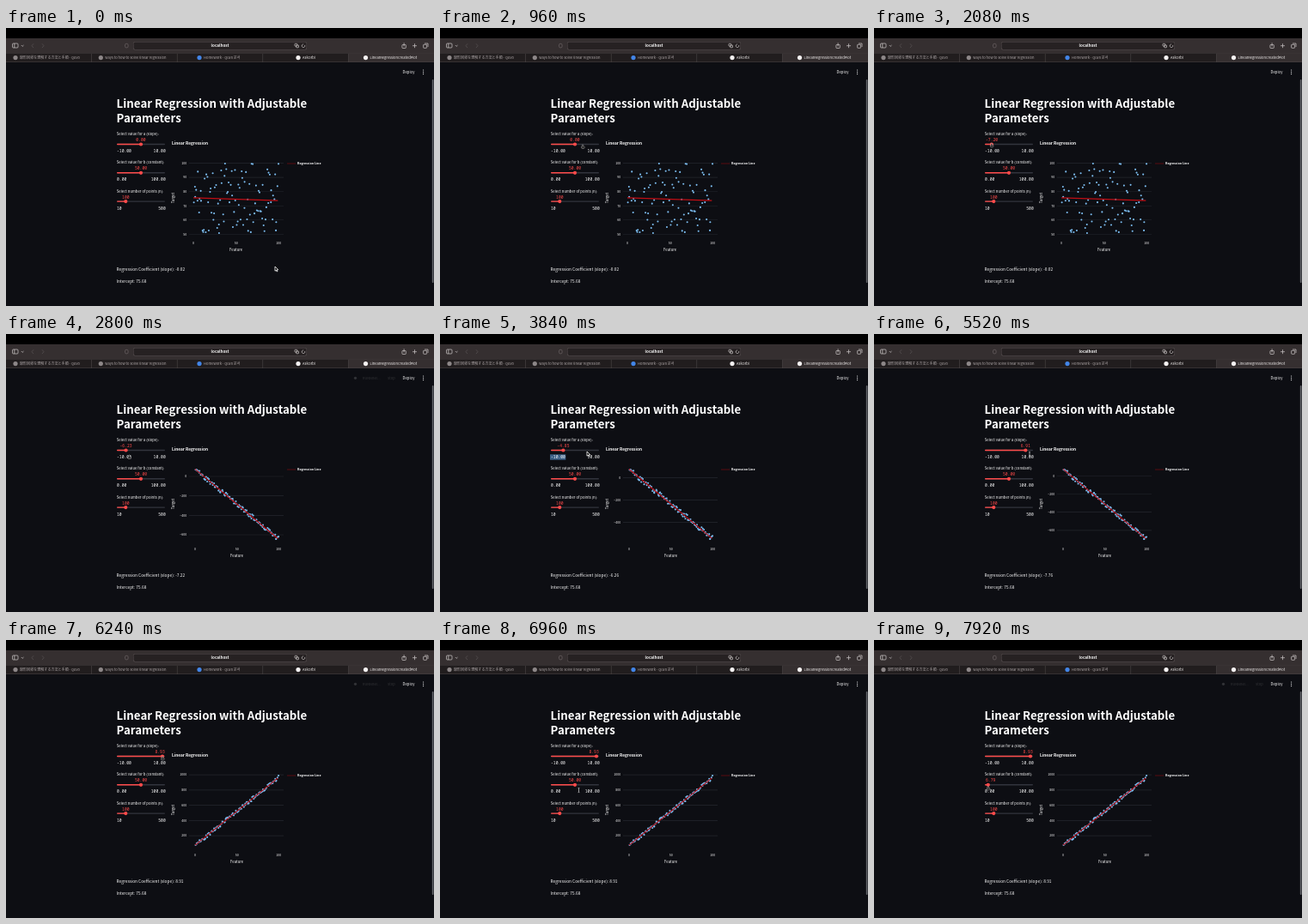
Write an HTML page with a canvas that moves like this. It is 498 px wide and 324 px high and loops after 8000 ms.

```html
<!DOCTYPE html>
<html lang="en">
<head>
<meta charset="utf-8">
<title>Linear Regression</title>
<style>
html, body { margin: 0; width: 100%; height: 100%; overflow: hidden; background: #0d0e13; }
canvas { display: block; width: 498px; height: 324px; }
</style>
</head>
<body>
<canvas id="stage" width="498" height="324"></canvas>
<script>
const ctx = document.getElementById('stage').getContext('2d');
const LOOP = 8000;
const SANS = '"Noto Sans CJK JP", "Noto Sans CJK", "Noto Sans", sans-serif';
const MONO = '"Noto Sans Mono", "DejaVu Sans Mono", monospace';
const PAGE = '#0d0e13', INK = '#fff', RED = '#ff4b4b';
const TRACK = { x: 129, w: 56, y: 135.5, gap: 33.3 };
const LAG = 80;   // the thumb trails the pointer
const BUSY = 160; // half the time the running note shows

// Pointer stops: time, x, y and the shape it takes from there on
const stops = [
  [240, 313, 278, 'arrow'], [800, 175, 148, 'hand'], [960, 166, 136.5, 'hand'],
  [1500, 157, 135, 'hand'], [2000, 136.84, 135, 'hand'], [2360, 136.84, 135, 'hand'],
  [2600, 136, 135, 'hand'], [2900, 146, 144, 'beam'], [3300, 130, 144, 'beam'],
  [3840, 171, 137, 'arrow'], [4160, 136, 136, 'hand'], [4640, 136, 136, 'hand'],
  [4760, 135.33, 136, 'hand'], [5120, 135.33, 136, 'beam'], [5520, 181, 140, 'beam'],
  [5640, 182, 136, 'hand'], [6400, 182, 136, 'beam'], [6960, 161.5, 175, 'beam'],
  [7280, 157, 169, 'hand'], [7440, 157, 169, 'hand'], [7800, 132.8, 171, 'hand']];
const slopeDrags = [[1500, 2800], [4640, 6200]];
const constDrags = [[7360, LOOP]];
const refits = [2320, 2960, 5040, 6160, 7960];

function pointerAt(t) {
  const next = stops.findIndex(s => s[0] > t);
  if (next < 0) return stops[stops.length - 1].slice(1);
  if (next === 0) return stops[0].slice(1);
  const [t0, x0, y0, kind] = stops[next - 1], [t1, x1, y1] = stops[next];
  const p = (t - t0) / (t1 - t0), e = p * p * (3 - 2 * p);
  return [x0 + (x1 - x0) * e, y0 + (y1 - y0) * e, kind];
}

// Where on its track a dragged thumb stands, from 0 to 1
function shareAt(drags, t) {
  const drag = drags.filter(d => d[0] + LAG <= t).pop();
  if (!drag) return 0.5;
  return (pointerAt(Math.min(t - LAG, drag[1]))[0] - TRACK.x) / TRACK.w;
}

const slopeAt = t => shareAt(slopeDrags, t) * 20 - 10;

function fittedAt(t) {
  const last = refits.filter(r => r <= t).pop();
  return last ? slopeAt(last - BUSY) : 0;
}

function seeded(seed) {
  return () => {
    seed = (seed + 0x6D2B79F5) | 0;
    let r = Math.imul(seed ^ (seed >>> 15), 1 | seed);
    r = (r + Math.imul(r ^ (r >>> 7), 61 | r)) ^ r;
    return ((r ^ (r >>> 14)) >>> 0) / 4294967296;
  };
}
const rnd = seeded(42);
const samples = Array.from({ length: 100 }, (_, i) => ({ x: i + rnd(), noise: 50 + rnd() * 50 }));

// Laid out at ten times the size so small glyphs keep fractional spacing
function text(str, x, y, size, { color = INK, align = 'left', weight = 500, font = SANS, turn = 0 } = {}) {
  ctx.save();
  ctx.translate(x, y);
  ctx.rotate(turn);
  ctx.scale(0.1, 0.1);
  ctx.font = `${weight} ${size * 10}px ${font}`;
  ctx.fillStyle = color;
  ctx.textAlign = align;
  ctx.fillText(str, 0, 0);
  ctx.restore();
}

function rect(x, y, w, h, color, r = 0) {
  ctx.fillStyle = color;
  ctx.beginPath();
  ctx.roundRect(x, y, w, h, r);
  ctx.fill();
}

function dot(x, y, r, color) {
  ctx.fillStyle = color;
  ctx.beginPath();
  ctx.arc(x, y, r, 0, 7);
  ctx.fill();
}

function line(pts, color, width = 0.7) {
  ctx.strokeStyle = color;
  ctx.lineWidth = width;
  ctx.beginPath();
  pts.forEach(([x, y]) => ctx.lineTo(x, y));
  ctx.stroke();
}

function box(x, y, w, h, color, r = 1) {
  ctx.strokeStyle = color;
  ctx.lineWidth = 0.7;
  ctx.beginPath();
  ctx.roundRect(x, y, w, h, r);
  ctx.stroke();
}

function toolbar() {
  const icon = '#cfcaca', faint = '#585253';
  rect(0, 0, 498, 12, '#000');
  rect(0, 12, 498, 17.5, '#352f30');
  box(7.5, 18, 6.5, 5, icon);
  line([[9.8, 18], [9.8, 23]], icon);
  line([[17.8, 20], [19.2, 21.4], [20.6, 20]], icon);
  line([[32, 18.3], [30, 20.7], [32, 23.1]], faint);
  line([[42, 18.3], [44, 20.7], [42, 23.1]], faint);
  box(138.5, 18.3, 3.6, 4.6, '#6c6566', 1.5);

  rect(148, 16, 202, 9.4, '#544d4e', 2);
  rect(148.5, 16.5, 201, 8.4, '#262122', 1.8);
  text('localhost', 249, 22.4, 4.6, { align: 'center', weight: 700 });
  box(336, 18.3, 2.8, 2.8, icon, 0.5);
  box(337.7, 20, 2.8, 2.8, icon, 0.5);
  ctx.beginPath();
  ctx.arc(346, 20.8, 1.8, -0.4, 4.8);
  ctx.stroke();

  box(460.9, 19.5, 4.4, 4, icon, 0.6);
  line([[463.1, 21.5], [463.1, 17.3]], icon);
  line([[473, 20.7], [478, 20.7]], icon);
  line([[475.5, 18.2], [475.5, 23.2]], icon);
  box(485.6, 19.3, 4, 4, icon, 0.6);
  line([[487, 18], [491, 18], [491, 22]], icon);
}

function tabs() {
  const w = 99.6, dim = '#b0a9aa', lit = '#f4f1f1';
  rect(0, 29.5, 498, 10.5, '#211d1e');
  rect(4 * w, 29.5, w, 10.5, '#352f30');
  rect(0, 29.2, 498, 0.5, '#484243');
  rect(0, 39.4, 498, 0.6, '#4c4647');
  for (let i = 1; i < 5; i++) rect(i * w - 0.3, 30, 0.6, 10, '#4c4647');
  [
    ['線形回帰を理解する方法と手順 - Quvo', 11, '#8d8788', dim],
    ['ways to how to solve linear regression', 110.3, '#8d8788', dim],
    ['Homework - Quvo 문서', 225, '#4285e8', dim],
    ['AskOrbi', 340, lit, lit],
    ['LinearRegressionCreatedPlot', 418.5, lit, lit]
  ].forEach(([name, x, mark, color]) => {
    dot(x, 34.6, 2.6, mark);
    text(name, x + 5, 36.1, 4.05, { color });
  });
}

function slider(row, label, min, max, share, value) {
  const x = TRACK.x + share * TRACK.w, y = TRACK.y + row * TRACK.gap;
  const half = value.length * 1.41;
  const mid = Math.min(Math.max(x, 130 + half), 184.7 - half);
  text(label, TRACK.x - 0.2, y - 10.4, 4.22);
  text(value, mid, y - 3.4, 4.7, { color: RED, align: 'center', font: MONO });
  rect(TRACK.x, y - 0.7, TRACK.w, 1.4, '#32343d', 0.7);
  rect(TRACK.x, y - 0.7, x - TRACK.x, 1.4, RED, 0.7);
  dot(x, y, 2.1, RED);
  text(min, TRACK.x, y + 9.6, 4.7, { font: MONO });
  text(max, 185.7, y + 9.6, 4.7, { font: MONO, align: 'right' });
}

// Fits the plot to the extent of its data and picks round ticks
function axes(slope) {
  const values = samples.map(s => slope * s.x + s.noise);
  const lo = Math.min(...values), hi = Math.max(...values), span = hi - lo;
  const decade = 10 ** Math.floor(Math.log10(span / 5));
  const gap = [1, 2, 5, 10].map(m => m * decade).find(g => g >= span / 5.2);
  const pad = span * 0.05, ticks = [];
  for (let v = Math.ceil((lo - pad) / gap) * gap; v <= hi + pad; v += gap) ticks.push(v);
  const widest = Math.max(...ticks.map(v => String(v).length));
  const x0 = 212 + 2 * widest;
  return {
    ticks,
    x: v => x0 + (317.3 - x0) * v / 100,
    y: v => 239 - (v - lo) / span * 81
  };
}

function chart(slope) {
  const { ticks, x, y } = axes(slope);
  const centre = { align: 'center' };
  text('Linear Regression', 193, 136, 4.8, { weight: 700 });
  ticks.forEach(v => {
    rect(213, y(v) - 0.3, 110, 0.6, '#24262e');
    text(String(v).replace('-', '−'), 210.3, y(v) + 1.3, 3.6, { align: 'right' });
  });
  [0, 50, 100].forEach(v => text(String(v), x(v), 251.5, 3.6, centre));
  text('Feature', x(50), 260.4, 4.3, centre);
  text('Target', 196.3, 198, 4.2, { ...centre, turn: -Math.PI / 2 });

  samples.forEach(s => dot(x(s.x), y(slope * s.x + s.noise), 1.05, '#7cbdf0'));
  const fit = v => [x(v), y(75.68 + (slope - 0.02) * v)];
  line([fit(0), fit(99)], '#c00d14', 1.1);
  line([[327, 158], [337, 158]], '#6d0c11', 0.8);
  text('Regression Line', 339, 159.4, 3.55, { weight: 700 });
}

function running() {
  const color = 'rgba(250,250,250,0.16)';
  dot(406.5, 51.3, 1.6, color);
  text('RUNNING...', 415, 52.8, 3.9, { color });
  text('Stop', 444, 52.8, 4.1, { color });
}

function pointer(x, y, kind) {
  ctx.save();
  ctx.translate(x, y);
  ctx.lineJoin = 'round';
  if (kind === 'arrow') {
    ctx.strokeStyle = '#fff';
    ctx.fillStyle = '#000';
    ctx.lineWidth = 0.8;
    ctx.beginPath();
    [[0, 0], [0, 5.2], [1.3, 4.1], [2.1, 5.9], [3, 5.5], [2.2, 3.8], [3.8, 3.7]]
      .forEach(p => ctx.lineTo(...p));
    ctx.closePath();
    ctx.fill();
    ctx.stroke();
  } else if (kind === 'hand') {
    ctx.strokeStyle = '#d8d8d8';
    ctx.fillStyle = '#333';
    ctx.lineWidth = 0.6;
    ctx.beginPath();
    ctx.roundRect(-0.6, -0.6, 1.2, 3, 0.6);
    ctx.roundRect(-1.4, 1.4, 3.4, 2.4, 0.9);
    ctx.stroke();
    ctx.fill();
  } else {
    line([[0, -2.4], [0, 2.4]], '#ddd');
    [-2.6, 2.6].forEach(end => line([[-1, end], [1, end]], '#ddd', 0.5));
  }
  ctx.restore();
}

function draw(t) {
  const slope = slopeAt(t), fitted = fittedAt(t);
  const constShare = shareAt(constDrags, t);

  rect(0, 0, 498, 324, PAGE);
  toolbar();
  tabs();
  if (refits.some(r => Math.abs(t - r) <= BUSY)) running();
  text('Deploy', 461.5, 53, 4.25);
  [49, 51.3, 53.6].forEach(y => dot(485.6, y, 0.6, INK));
  rect(495.8, 60, 1.7, 237, '#62646a', 0.8);

  text('Linear Regression with Adjustable', 128.6, 92.8, 13.31, { weight: 700 });
  text('Parameters', 128.6, 110.2, 13.31, { weight: 700 });

  if (t >= 3200 && t < 4480) rect(128, 140.3, 18.3, 6.4, '#3b5f85');
  slider(0, 'Select value for a (slope):', '-10.00', '10.00', slope / 20 + 0.5, slope.toFixed(2));
  slider(1, 'Select value for b (constant):', '0.00', '100.00', constShare, (constShare * 100).toFixed(2));
  slider(2, 'Select number of points (n):', '10', '500', 90 / 490, '100');

  chart(fitted);
  text('Regression Coefficient (slope): ' + (fitted - 0.02).toFixed(2), 128.6, 283, 4.8);
  text('Intercept: 75.68', 128.6, 296.9, 4.8);
  pointer(...pointerAt(t));
}

const start = performance.now();
function frame() {
  draw((performance.now() - start) % LOOP);
  requestAnimationFrame(frame);
}
frame();
</script>
</body>
</html>
```
